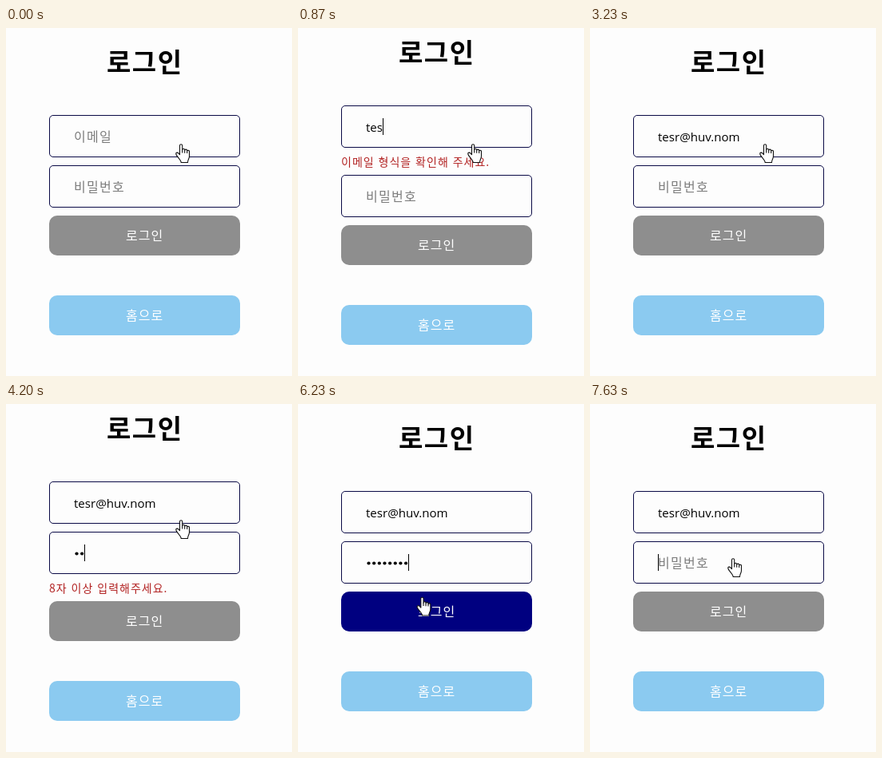
An HTML page for the animation above (8000 ms loop, 358 px wide and 436 px high).

```html
<!DOCTYPE html>
<html lang="ko">
<head>
<meta charset="utf-8">
<title>로그인</title>
<style>
  html, body { margin: 0; width: 100%; height: 100%; overflow: hidden; background: #fdfdfd; }
  svg { display: block; }
  text { font: 16px "Noto Sans CJK KR", "Noto Sans CJK", "Noto Sans CJK JP", sans-serif; letter-spacing: 1px; }
  .title { font-size: 33px; font-weight: 700; letter-spacing: 1.5px; fill: #000; }
  .field { fill: #fdfdfd; stroke: #0a0a46; }
  .hint { fill: #7c7c7c; letter-spacing: 1.3px; }
  .label { fill: #fff; }
  .error { font-size: 14px; fill: #b22222; }
  #mail { font: 15.1px "Open Sans", "Noto Sans", sans-serif; letter-spacing: 0; fill: #000; }
</style>
</head>
<body>
<svg width="358" height="436" viewBox="0 0 358 436">
  <text id="title" class="title" x="126" y="55.2">로그인</text>
  <g id="mailBox">
    <rect class="field" x="54.5" y="109.5" width="238" height="52" rx="4.5"/>
    <text id="mailHint" class="hint" x="85" y="142">이메일</text>
    <text id="mail" x="85" y="142"></text>
    <text id="mailError" class="error" x="54" y="184.8">이메일 형식을 확인해 주세요.</text>
  </g>
  <g id="passBox">
    <rect class="field" x="54.5" y="172.5" width="238" height="52" rx="4.5"/>
    <text id="passHint" class="hint" x="85" y="205">비밀번호</text>
    <g id="dots"></g>
    <text id="passError" class="error" x="54" y="248">8자 이상 입력해주세요.</text>
  </g>
  <g id="buttons">
    <rect id="login" x="54" y="235" width="239" height="50" rx="10"/>
    <text class="label" x="150" y="266">로그인</text>
    <rect x="54" y="335" width="239" height="50" rx="10" fill="#8bcaf0"/>
    <text class="label" x="150" y="366">홈으로</text>
  </g>
  <rect id="caret" width="1" height="21"/>
  <g id="hand" fill="#fff" stroke="#111" stroke-width="1.1" stroke-linejoin="round">
    <path d="M5.5 13.6V2.3a1.6 1.6 0 0 1 3.2 0V7.6a1.5 1.4 0 0 1 3 .2v.6a1.5 1.4 0 0 1 3 .3v.7a1.4 1.3 0 0 1 2.8.5V15.5c0 3.4-2 4.3-2 8H7.2C7.2 20 1.6 16.2.8 13c-.4-2.1 2-2.5 3.2-1z"/>
    <path d="M8.7 7.6v4M11.7 8.4v3.4M14.7 9.4v2.6" fill="none"/>
  </g>
</svg>
<script>
const LOOP = 8000;
const ADDRESS = "tesr@huv.nom";
const PITCH = 6.65, MIN_PASS = 8;
const IDLE = [142, 142, 142], READY = [0, 0, 128];
const $ = id => document.getElementById(id);

const clamp = v => Math.min(1, Math.max(0, v));
const part = (t, from, span) => clamp((t - from) / span);
const between = (t, from, to) => t >= from && t < to;
const move = (el, x, y) => el.setAttribute("transform", `translate(${x} ${y})`);
const show = (el, on) => el.setAttribute("visibility", on ? "visible" : "hidden");

// Number of keys hit so far in a burst of n evenly spaced keys
const keys = (t, from, n, span = 1) =>
  t < from ? 0 : 1 + Math.floor((n - 1) * part(t, from, span));

const mailLength = t =>
  keys(t, 869, 3) + keys(t, 930, 1) + keys(t, 2000, 5, 130) + keys(t, 2370, 3, 160);

const passLength = t => t >= 7500 ? 0 :
  keys(t, 3570, 1) + keys(t, 4170, 6, 230) + keys(t, 4630, 1) - keys(t, 6500, 1);

for (let i = 0; i < MIN_PASS; i++) {
  const dot = document.createElementNS("http://www.w3.org/2000/svg", "circle");
  dot.setAttribute("cx", 88.5 + i * PITCH);
  dot.setAttribute("cy", 199.5);
  dot.setAttribute("r", 2.1);
  $("dots").append(dot);
}

function draw(t) {
  const typed = ADDRESS.slice(0, mailLength(t)), count = passLength(t);
  const badMail = typed !== "" && !/^\w+@\w+\.\w{2,}$/.test(typed);
  const badPass = count > 0 && count < MIN_PASS;

  // An error line makes the centred form 24px taller
  const rise = badMail || badPass ? 12 : 0;
  const passY = badMail ? rise : -rise;
  move($("title"), 0, -rise);
  move($("mailBox"), 0, -rise);
  move($("passBox"), 0, passY);
  move($("buttons"), 0, rise);
  show($("mailError"), badMail);
  show($("passError"), badPass);

  $("mail").textContent = typed;
  show($("mailHint"), !typed);
  show($("passHint"), !count);
  [...$("dots").children].forEach((dot, i) => show(dot, i < count));

  const k = t < 6970 ? part(t, 4630, 140) : 0;
  const fill = IDLE.map((c, i) => Math.round(c + (READY[i] - c) * k));
  $("login").setAttribute("fill", `rgb(${fill})`);

  const inMail = t < 2670;
  const blink = between(t, 3230, 3570) || between(t, 7130, 7500);
  const width = inMail ? $("mail").getComputedTextLength() : count * PITCH;
  show($("caret"), t >= 30 && !blink);
  move($("caret"), Math.round(85 + width), inMail ? 125 - rise : 188 + passY);

  // The pointer swings down over the button on its way to the password field
  const m = part(t, 6170, 160), arc = Math.sin(Math.PI * m);
  move($("hand"), 212 - 40 * m - 52 * arc, 145 + 48 * m + 84 * arc);
}

const start = performance.now();
function tick() {
  draw((performance.now() - start) % LOOP);
  requestAnimationFrame(tick);
}
tick();
</script>
</body>
</html>
```
